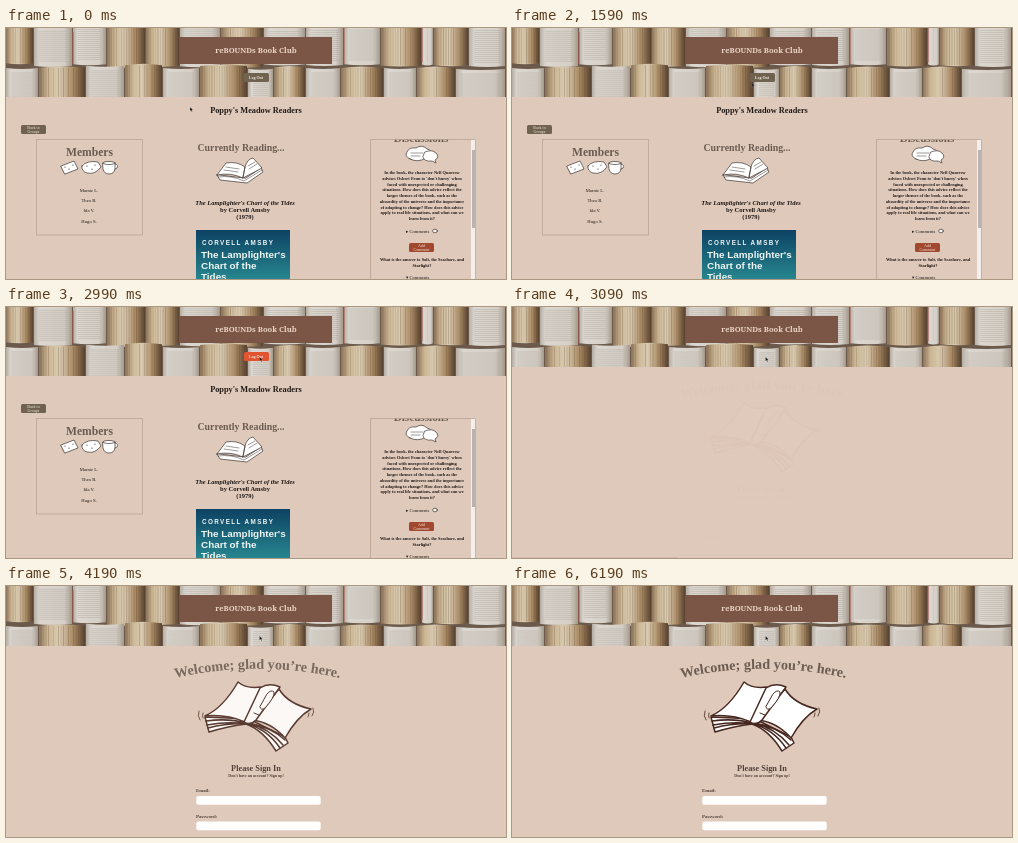
Animation, 500 px wide and 251 px high, one loop 6.69 s. Source, as an HTML page:

```html
<!DOCTYPE html>
<html lang="en">
<head>
<meta charset="utf-8">
<title>Book club sign out</title>
<style>
  html, body { margin: 0; width: 100%; height: 100%; overflow: hidden; background: #dfc9ba; }
  svg { display: block; width: 100%; height: 100%; }
  text { font-family: "Liberation Serif", serif; fill: #201916; }
  .bold { font-weight: bold; }
  .mid { text-anchor: middle; }
  .head { font-weight: bold; fill: #6b5c52; }
  .brand { font: bold 7.6px "Noto Serif", serif; fill: #ecd6c6; }
  .cover { font-family: "Liberation Sans", sans-serif; font-weight: bold; fill: #eef5f3; }
  .button { fill: #f3e8df; font-size: 4px; }
  .ink { fill: #fff; stroke: #3d3431; stroke-width: .7; stroke-linejoin: round; stroke-linecap: round; }
  .box { fill: none; stroke: #b8a395; stroke-width: .8; }
  #shelf { filter: blur(.7px); }
  #form text { fill: #51413a; }
  #bigBook { fill: #fff; stroke: #472820; stroke-width: 1.5; stroke-linejoin: round; stroke-linecap: round; }
</style>
</head>
<body>
<svg viewBox="0 0 500 251" preserveAspectRatio="none">
  <defs>
    <linearGradient id="sea" x2="0" y2="1">
      <stop stop-color="#0d4263"/><stop offset="1" stop-color="#27868f"/>
    </linearGradient>
    <linearGradient id="fan">
      <stop stop-color="#8d745a"/><stop offset=".2" stop-color="#cdb896"/><stop offset=".45" stop-color="#d9cbb2"/>
      <stop offset=".75" stop-color="#a98a64"/><stop offset="1" stop-color="#574230"/>
    </linearGradient>
    <linearGradient id="page">
      <stop stop-color="#b5ada3"/><stop offset=".15" stop-color="#dcd7d0"/>
      <stop offset=".8" stop-color="#d5cfc7"/><stop offset="1" stop-color="#a3988b"/>
    </linearGradient>
    <clipPath id="panel"><path d="M364 111h106v140h-106z"/></clipPath>
    <path id="arch" d="M167 92.5Q251 73 336 92.5"/>
  </defs>

  <g id="shelf"></g>

  <g id="club">
    <path fill="#dfc9ba" d="M0 69h500v182H0z"/>
    <rect id="logOut" x="238" y="45" width="25" height="9" rx="1.5"/>
    <text class="button mid bold" x="250" y="51">Log Out</text>
    <text class="bold mid" x="250" y="84.5" font-size="8.3">Poppy's Meadow Readers</text>
    <rect x="15" y="97" width="25" height="9" rx="1.5" fill="#6f6350"/>
    <text class="button mid" x="27.5" y="101">Back to</text>
    <text class="button mid" x="27.5" y="105">Groups</text>

    <rect class="box" x="30.5" y="111.5" width="106" height="95.5"/>
    <text class="head mid" x="83.5" y="128" font-size="11.6">Members</text>
    <g class="ink">
      <path d="M55 138l13-5 4 8-13 5zM76 138q5-6 16-4l3 5q-6 8-14 6-6-2-5-7zM97 135h12v6q-1 5-6 5t-6-5zM109 136q4 1 2 4l-2 1"/>
      <path d="M59 139v.1M63 141v.1M67 137v.1M81 138v.1M86 141v.1M89 137v.1" stroke-width="1.2"/>
      <ellipse cx="103" cy="135" rx="6" ry="1.5"/>
    </g>
    <g id="members"></g>

    <text class="head mid" x="235" y="123" font-size="9.9">Currently Reading...</text>
    <g class="ink">
      <path d="M211 147l3 5 27 3 16-11-2-4-15 10z"/>
      <path d="M211 147l9-12q11-2 19 4l-2 11q-13-6-26-3zM239 139q2-8 8-9l9 10-19 10z"/>
      <path d="M212 149q13-2 26 4l18-11M220 139l13 2M218 142l14 2M242 138l7-4M243 141l8-5" fill="none" stroke-width=".5"/>
    </g>
    <text class="bold mid" x="239" y="177" font-size="6.5" font-style="italic">The Lamplighter's Chart of the Tides</text>
    <text class="bold mid" x="239" y="184" font-size="6.5">by Corvell Amsby</text>
    <text class="bold mid" x="239" y="191.3" font-size="6.5">(1979)</text>
    <path fill="url(#sea)" d="M190 202h94v49h-94z"/>
    <text class="cover" x="196" y="217" font-size="6.3" letter-spacing="1.4">CORVELL AMSBY</text>
    <g font-size="9.9">
      <text class="cover" x="195" y="230">The Lamplighter's</text>
      <text class="cover" x="195" y="241">Chart of the</text>
      <text class="cover" x="195" y="252">Tides</text>
    </g>

    <g clip-path="url(#panel)">
      <text class="head mid" x="415" y="113.7" font-size="11.2">Discussions</text>
      <g class="ink">
        <path d="M404 131q-6-3-3-7 2-5 9-4 6-4 11 1 5 1 4 5 0 4-5 4-8 5-16 1z"/>
        <path d="M419 124q7-3 11 1 4 4-1 7l1 3-4-2q-8 1-9-4z"/>
        <path d="M405 125h12M405 128h9" stroke-width=".5"/>
      </g>
      <g id="question"></g>
      <text x="400" y="204.5" font-size="4.6">▸ Comments</text>
      <ellipse class="ink" cx="429" cy="203" rx="2.3" ry="1.8" stroke-width=".4"/>
      <rect x="403" y="215" width="25" height="9" rx="1.5" fill="#a1482f"/>
      <text class="button mid" x="415.5" y="219">Add</text>
      <text class="button mid" x="415.5" y="223">Comment</text>
      <text x="400" y="251" font-size="4.6">▾ Comments</text>
      <path fill="#f3efec" d="M465 111h5v140h-5z"/>
      <path fill="#b9b4b0" d="M466 122h3v78h-3z"/>
      <path class="box" d="M364.5 251V111.5h105V251"/>
    </g>
  </g>

  <g id="signIn">
    <path fill="#dfc9ba" d="M0 60h500v191H0z"/>
    <g id="art">
      <text class="head mid" font-size="14.2"><textPath href="#arch" startOffset="50%">Welcome; glad you’re here.</textPath></text>
      <g id="bigBook">
        <path d="M199 131l4 15q20-6 37-8 17 6 30 27l12-8-3-6-36-18z"/>
        <path d="M200 135q22-3 40 2M201 139q22-4 39-1M202 142q20-5 38-4M243 137q22 4 36 17M242 137q21 5 35 22M241 138q20 5 33 24" fill="none"/>
        <path d="M199 130q18-8 33-34 8 7 23 5l-16 35q-19-8-40-6z"/>
        <path d="M273 103q9 15 32 20-14 8-26 29-14-16-33-18z"/>
        <path d="M254 102q9-6 20-1l-24 33q-6 6-12 2z"/>
        <path d="M261 108q4-5 7-2 1 5-9 16-4 3-5-1zM248 127l5 2" stroke-width="1"/>
        <path d="M193 125q-2 5 1 9M197 127q-1 3 0 5M307 122q2 4-1 8M303 127q0 2-1 4" fill="none" stroke-width=".8"/>
      </g>
    </g>
    <g id="form">
      <text class="bold mid" x="250" y="185" font-size="8.3">Please Sign In</text>
      <text class="bold mid" x="250" y="190.7" font-size="4">Don't have an account? Sign up!</text>
      <text class="bold" x="190" y="206" font-size="4.8">Email:</text>
      <text class="bold" x="190" y="231.5" font-size="4.8">Password:</text>
      <g fill="#fff">
        <rect x="190.3" y="210" width="124.4" height="8.8" rx="2"/>
        <rect x="190.3" y="235.5" width="124.4" height="8.8" rx="2"/>
      </g>
    </g>
    <path id="status" fill="#cfbcae" d="M0 250h166v1H0z"/>
  </g>

  <path fill="#7b5546" d="M174 9h152v27H174z"/>
  <text class="brand mid" x="250" y="24.5">reBOUNDs Book Club</text>
  <path id="cursor" d="M0 0v4l1-.8.8 1.6.7-.3-.7-1.6H3z" fill="#111" stroke="#eee" stroke-width=".2"/>
</svg>

<script>
const LOOP = 6690, SIGN_IN = 3090;
const $ = id => document.getElementById(id);

let seed = 7;
const random = () => (seed = seed * 16807 % 2147483647) / 2147483647;

// Open books side by side: [right edge, gradient]
const upperRow = [[28, 'fan'], [67, 'page'], [101, 'page'], [140, 'fan'], [174, 'fan'], [215, 'page'],
  [258, 'fan'], [300, 'page'], [338, 'page'], [375, 'page'], [416, 'fan'], [428, 'page'], [463, 'fan'], [500, 'page']];
const lowerRow = [[33, 'page'], [80, 'fan'], [119, 'page'], [157, 'fan'], [194, 'page'], [242, 'fan'],
  [268, 'page'], [300, 'fan'], [335, 'page'], [378, 'fan'], [411, 'page'], [450, 'fan'], [500, 'page']];

function drawRow(books, top, bottom) {
  let left = 0, out = '';
  for (const [right, kind] of books) {
    const y = top + random() * 4, end = bottom - random() * 4, w = right - left - 1, middle = left + w / 2;
    const sag = kind === 'fan' ? -3 : 2;
    out += `<path d="M${left} ${y}Q${middle} ${y + sag} ${left + w} ${y}V${end}Q${middle} ${end + 2} ${left} ${end}z" fill="url(#${kind})"/>`;
    if (kind === 'fan') {
      for (let x = left + 2; x < right - 2; x += 2.5)
        out += `<path d="M${x} ${y}V${end}" stroke="#5c4028" stroke-width=".7" opacity="${random() * .4}"/>`;
    } else {
      for (let line = y + 5; line < end - 3; line += 2)
        out += `<path d="M${left + 5} ${line}H${right - 6}" stroke="#8f867c" stroke-width=".7" opacity=".35"/>`;
    }
    left = right;
  }
  return out;
}

$('shelf').innerHTML = '<path fill="#6b5a4c" d="M-5-5h510v80H-5z"/>' +
  drawRow(upperRow, -5, 39) + drawRow(lowerRow, 37, 75) +
  '<path d="M67 4v32M338 0v36M416 0v34" stroke="#b0564a"/>';

const centredLines = (lines, x, y, pitch, attrs) => lines.map((line, i) =>
  `<text class="mid" x="${x}" y="${y + i * pitch}" ${attrs}>${line}</text>`).join('');

$('members').innerHTML =
  centredLines(['Marnie L.', 'Theo B.', 'Ida V.', 'Hugo S.'], 83, 163.5, 10.4, 'font-size="4.7"');

const small = 'font-size="4.4" font-weight="bold"';
$('question').innerHTML = centredLines([
  'In the book, the character Nell Quarrow',
  "advises Osbert Fenn to 'don't hurry' when",
  'faced with unexpected or challenging',
  'situations. How does this advice reflect the',
  'larger themes of the book, such as the',
  'absurdity of the universe and the importance',
  'of adapting to change? How does this advice',
  'apply to real life situations, and what can we',
  'learn from it?'], 416, 146, 5.75, small) +
  centredLines(['What is the answer to Salt, the Seashore, and', 'Starlight?'], 416, 233, 5.8, small);

// Linear interpolation through [time, ...values] stops
function track(t, stops) {
  const i = stops.findIndex(s => s[0] > t);
  if (i < 0) return stops.at(-1).slice(1);
  if (i === 0) return stops[0].slice(1);
  const [a, b] = [stops[i - 1], stops[i]], k = (t - a[0]) / (b[0] - a[0]);
  return a.slice(1).map((v, j) => v + (b[j + 1] - v) * k);
}

const cursorPath = [[0, 184, 79], [100, 184, 79], [990, 221, 65], [1700, 243, 53], [2190, 253.5, 50]];
const artFade = [[3090, .01], [3190, .7], [3390, .7], [4190, .88], [5190, 1]];

function draw(t) {
  const [x, y] = track(t, cursorPath);
  const hover = x >= 238 && y <= 54;
  const signedOut = t >= SIGN_IN;
  $('cursor').setAttribute('transform', `translate(${x} ${y})`);
  $('logOut').setAttribute('fill', hover ? '#e2532f' : '#6f6350');
  $('club').style.display = signedOut ? 'none' : '';
  $('signIn').style.display = signedOut ? '' : 'none';
  $('art').setAttribute('opacity', track(t, artFade)[0]);
  $('form').setAttribute('opacity', t < 3190 ? .01 : 1);
  $('status').style.display = t < 3190 ? '' : 'none';
}

const start = performance.now();
function tick() {
  draw((performance.now() - start) % LOOP);
  requestAnimationFrame(tick);
}
tick();
</script>
</body>
</html>
```
